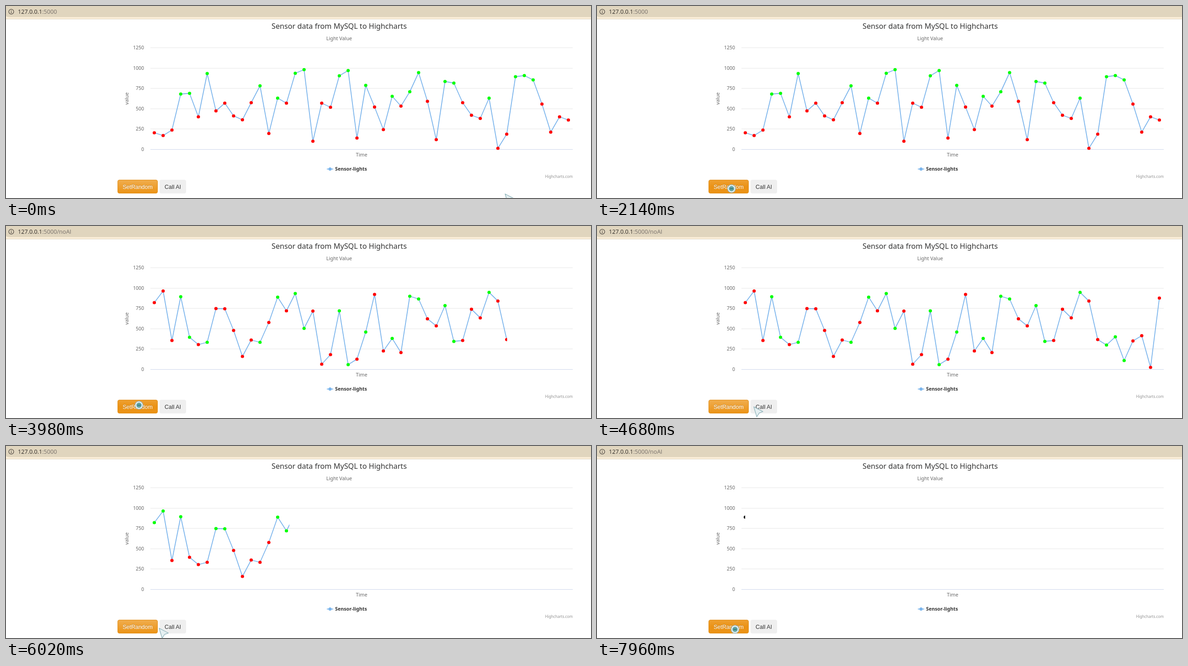
An HTML page for the animation above (8 s loop, 1280 by 421 pixels).

```html
<!DOCTYPE html>
<html lang="en">
<head>
<meta charset="utf-8">
<title>Sensor chart</title>
<style>
html, body { margin: 0; width: 100%; height: 100%; overflow: hidden; background: #fff; }
svg { display: block; width: 100%; height: 100%; }
text { font: 500 10.8px "Noto Sans", sans-serif; fill: #666; white-space: pre; }
.mid { text-anchor: middle; }
.end { text-anchor: end; }
.ui { font: 12.4px "Liberation Sans", Arial, sans-serif; fill: #333; }
.url { font: 12.6px "Open Sans", sans-serif; fill: #77706a; }
</style>
</head>
<body>
<svg viewBox="0 0 1280 421">
  <defs>
    <linearGradient id="warm" gradientUnits="userSpaceOnUse" x1="0" y1="381" x2="0" y2="411">
      <stop stop-color="#f0ad4e"/><stop offset="1" stop-color="#eb9316"/>
    </linearGradient>
    <linearGradient id="hot" gradientUnits="userSpaceOnUse" x1="0" y1="366" x2="0" y2="396">
      <stop stop-color="#f0ad4e"/><stop offset="1" stop-color="#eb9316"/>
    </linearGradient>
    <clipPath id="reveal"><rect id="wipe" x="316" y="80" height="245"/></clipPath>
  </defs>

  <rect width="1280" height="28" fill="#fdf0da"/>
  <path d="M0 0H1280V24.5H6Q2 24.5 0 22Z" fill="#e0d5be"/>
  <path d="M0 28.5H1280" stroke="#d9cdb8"/>
  <circle cx="11.5" cy="12.5" r="5.4" fill="none" stroke="#5a534b" stroke-width="1.3"/>
  <path d="M11.5 9V10.4M11.5 11.7V15.8" stroke="#5a534b" stroke-width="1.4"/>
  <text class="url" x="26" y="17"><tspan fill="#2f2a26">127.0.0.1</tspan>:5000<tspan id="path"></tspan></text>

  <text class="ui" id="blank" x="244" y="42">Insert Highchart Here</text>

  <g id="chart">
    <g id="grid"></g>
    <text class="mid" x="729" y="50" style="font-size:16.2px;font-weight:400;fill:#333">Sensor data from MySQL to Highcharts</text>
    <text class="mid" x="729" y="75">Light Value</text>
    <text class="mid" x="778" y="329.5">Time</text>
    <text class="mid" transform="translate(268 203) rotate(-90)">value</text>
    <path d="M702 357.5H716" stroke="#7cb5ec" stroke-width="1.8"/>
    <circle cx="709" cy="357.5" r="3.6" fill="#7cb5ec"/>
    <text x="720" y="361" style="font-weight:700;font-size:10.7px;fill:#333">Sensor-lights</text>
    <text class="end" x="1240" y="377" style="font-size:8.15px;font-weight:400;fill:#909090">Highcharts.com</text>
    <g id="series" clip-path="url(#reveal)"></g>
  </g>

  <rect id="set" x="244.5" y="381.5" width="87" height="29" rx="3.5" stroke="#e38d13"/>
  <text class="ui mid" x="288" y="400" style="fill:#000;opacity:.2">SetRandom</text>
  <text class="ui mid" x="288" y="401" style="fill:#fff">SetRandom</text>
  <rect id="call" x="336" y="381" width="58" height="30" rx="4" fill="#efefef"/>
  <rect id="focus" x="338" y="384" width="54" height="25" rx="3" fill="#efefef" stroke="#111" stroke-width="2"/>
  <text class="ui mid" x="365" y="401">Call AI</text>

  <path id="arrow" d="M0 0L20 10.500L12 13.500L6.500 22Z" fill="#e6f0f2" stroke="#8fb3ba" stroke-width="1.3" stroke-linejoin="round"/>
  <g id="ring">
    <circle r="8.600" fill="#fff" stroke="#9db5b9" stroke-width="1.6"/>
    <circle r="5.800" fill="#62a5a5" stroke="#9cc4c4"/>
    <path d="M-3.500 0H3.500" stroke="#3f7f80" stroke-width="2.500"/>
  </g>
</svg>
<script>
const LOOP = 8000, LEFT = 316, WIDTH = 924;
const $ = id => document.getElementById(id);
const show = (id, on) => $(id).setAttribute('visibility', on ? 'inherit' : 'hidden');

// Vertical positions of the samples
const before = [278, 284, 272, 193, 191.5, 243, 148, 230, 213, 241, 249.5, 212, 175, 279.5, 202, 213,
  147.5, 139.5, 296.5, 213, 222, 153, 141.5, 289.5, 174, 221.5, 271, 198, 219.5, 188, 146, 209,
  293, 165.5, 169, 212, 239.5, 246.5, 202, 312, 281, 155, 152.5, 162, 215, 276.5, 243, 250];
const after = [168, 142.5, 251, 155, 244, 260, 255, 181, 181.5, 229, 286, 250, 255, 211.5, 156, 186,
  148, 224.5, 186.5, 303, 282, 186, 304, 292, 232.5, 150, 274, 246.5, 277.5, 154, 160, 203.5,
  219, 174.5, 253, 251, 182.5, 201.5, 145.5, 164.5, 249, 261, 243, 295, 252, 240.5, 310, 158];
const guessed = new Set([3, 4, 6, 12, 14, 16, 17, 21, 22, 24, 27, 29, 30, 33, 34, 38, 41, 42, 43]);

const pick = green => green ? '#0f0' : '#f00';
const byLevel = (y, i) => pick(y < 207);
const byGuess = (y, i) => pick(guessed.has(i));

// Each page: time it appears, path, samples (none while loading), colour rule, start of the wipe
const pages = [
  { at: 0, path: '', ys: before, color: byLevel, wipe: -2000 },
  { at: 2830, path: '/noAI' },
  { at: 3095, path: '/noAI', ys: after, color: byGuess, wipe: 3239 },
  { at: 5460, path: '' },
  { at: 5600, path: '', ys: after, color: byLevel, wipe: 5632 },
  { at: 7690, path: '/noAI' },
  { at: 7885, path: '/noAI', ys: [156], color: () => '#111', wipe: 7901 }
];

// Pointer stops: time, x, y
const stops = [
  [0, 1092, 412], [140, 1092, 412], [210, 1066, 410], [280, 930, 388], [350, 765, 345],
  [420, 730, 328], [490, 622, 328], [560, 567, 344], [630, 485, 375], [700, 445, 394],
  [760, 410, 396], [820, 331, 404], [950, 297, 409], [1650, 297, 409], [2400, 293, 396],
  [2560, 293, 395], [2900, 293, 395], [3300, 291, 393], [4300, 291, 393], [4550, 320, 398],
  [4800, 364, 395], [5750, 364, 395], [6050, 332, 400], [6250, 313, 403], [6860, 313, 403],
  [7300, 302, 402], [8000, 302, 402]
];

$('grid').innerHTML = [91.5, 136.5, 180.5, 225.5, 269.5, 314.5].map((y, i) =>
  `<path d="M${LEFT} ${y}H${LEFT + WIDTH}" stroke="${i < 5 ? '#e6e6e6' : '#ccd6eb'}"/>
   <text class="end" x="302" y="${y + 3.7}" style="font-size:10.5px">${1250 - 250 * i}</text>`).join('');

function drawSeries({ ys, color }) {
  const x = i => (324.5 + i * 906 / 47).toFixed(1);
  const line = ys.map((y, i) => x(i) + ',' + y).join(' ');
  $('series').innerHTML =
    `<polyline points="${line}" fill="none" stroke="#7cb5ec" stroke-width="1.8" stroke-linejoin="round"/>` +
    ys.map((y, i) => `<circle cx="${x(i)}" cy="${y}" r="3.6" fill="${color(y, i)}"/>`).join('');
}

function pointerAt(t) {
  const n = Math.max(1, stops.findIndex(s => s[0] > t));
  const [t0, x0, y0] = stops[n - 1], [t1, x1, y1] = stops[n];
  const k = (t - t0) / (t1 - t0);
  return [x0 + (x1 - x0) * k, y0 + (y1 - y0) * k];
}

let current;
function render(t) {
  const page = pages.findLast(p => p.at <= t);
  if (page !== current) {
    current = page;
    $('path').textContent = page.path;
    show('chart', page.ys);
    show('blank', !page.ys);
    if (page.ys) drawSeries(page);
  }
  if (page.ys) {
    const k = Math.min(1, Math.max(0, (t - page.wipe) / 1000));
    $('wipe').setAttribute('width', WIDTH * (1 - Math.cos(Math.PI * k)) / 2);
  }

  const [x, y] = pointerAt(t);
  const hover = x <= 332 && y > 381;
  const focused = t >= 5170 && t < 5460;
  $('set').setAttribute('fill', hover ? 'url(#hot)' : 'url(#warm)');
  show('call', !focused);
  show('focus', focused);
  show('ring', hover);
  show('arrow', !hover);
  $('ring').setAttribute('transform', `translate(${x} ${y}) scale(${page.ys ? 1 : 1.15})`);
  $('arrow').setAttribute('transform', `translate(${x} ${y})`);
}

const began = performance.now();
function tick() {
  render((performance.now() - began) % LOOP);
  requestAnimationFrame(tick);
}
tick();
</script>
</body>
</html>
```
